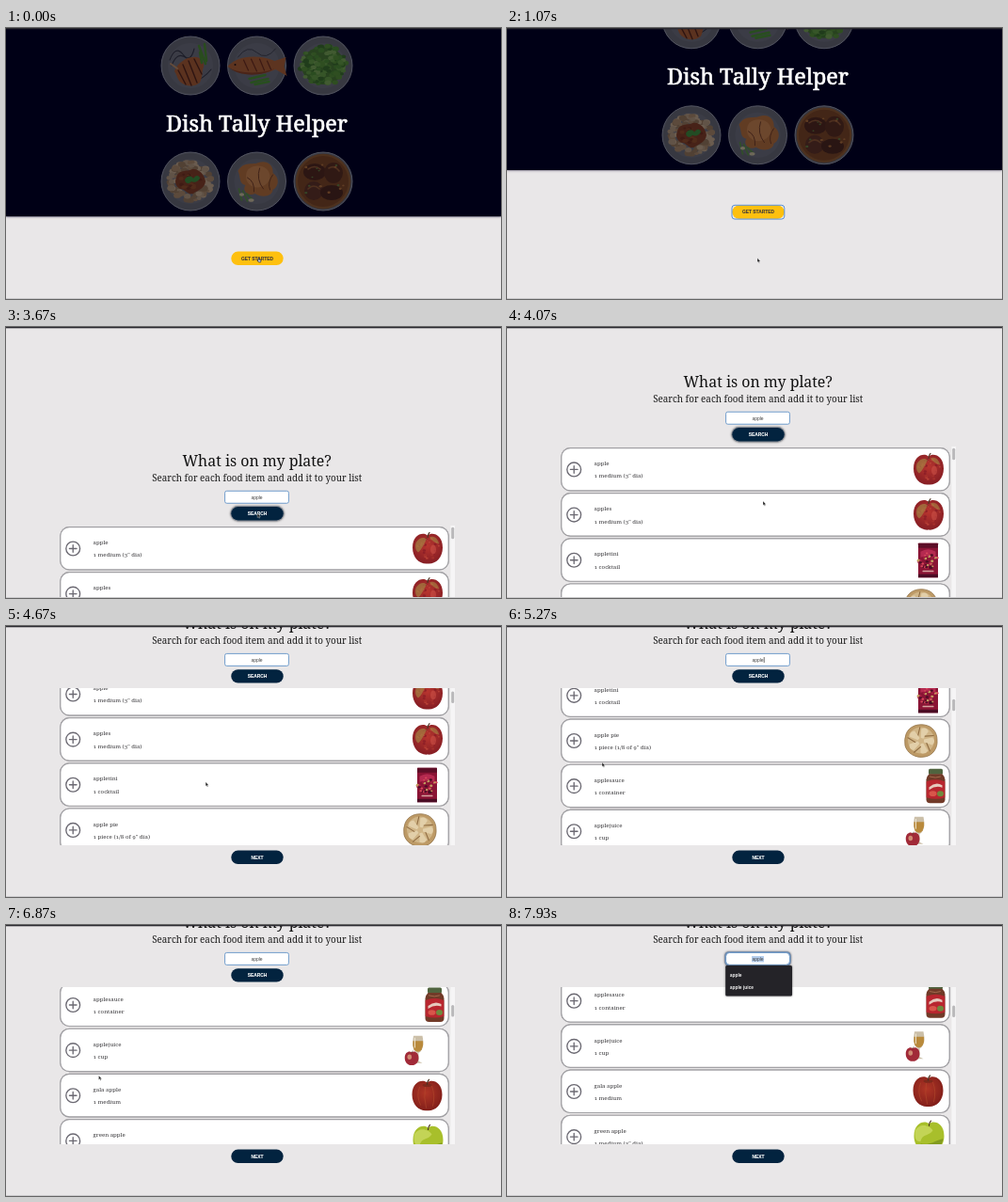
An HTML page that plays this animation: 526 px wide and 288 px high, repeating every 8000 ms.

```html
<!DOCTYPE html>
<html lang="en">
<head>
<meta charset="utf-8">
<title>Meal list demo</title>
<style>
html, body { margin: 0; width: 100%; height: 100%; overflow: hidden; background: #e9e7e8; }
svg { display: block; width: 100vw; height: 100vh; }
text { white-space: pre; }
.serif { font-family: "Noto Serif", serif; font-variant-numeric: oldstyle-nums; }
.sans { font-family: "Liberation Sans", Arial, sans-serif; }
.mid { text-anchor: middle; }
.bold { font-weight: 700; }
.card { fill: #fff; stroke: #a2a1a5; stroke-width: 1.2; filter: drop-shadow(0 .5px .7px rgba(0,0,0,.35)); }
</style>
</head>
<body>
<svg id="stage" viewBox="0 0 526 288" preserveAspectRatio="none"></svg>
<script>
const LOOP = 8000, FPS = 15, PITCH = 48.15;
const LIST_TOP = 463, LIST_H = 167;

let seed = 11;
const rnd = () => (seed = (seed * 16807) % 2147483647) / 2147483647;

const path = (d, fill, extra = '') => `<path d="${d}" fill="${fill}" ${extra}/>`;
const line = (d, color, w = 1) => path(d, 'none', `stroke="${color}" stroke-width="${w}" stroke-linecap="round"`);
const oval = (x, y, rx, ry, fill, extra = '') =>
  `<ellipse cx="${x}" cy="${y}" rx="${rx}" ry="${ry}" fill="${fill}" ${extra}/>`;
const rect = (x, y, w, h, r, fill, extra = '') =>
  `<rect x="${x}" y="${y}" width="${w}" height="${h}" rx="${r}" fill="${fill}" ${extra}/>`;
const text = (x, y, size, fill, cls, str, extra = '') =>
  `<text x="${x}" y="${y}" font-size="${size}" fill="${fill}" class="${cls}" ${extra}>${str}</text>`;
const at = (x, y, body, extra = '') => `<g transform="translate(${x} ${y})" ${extra}>${body}</g>`;

// Scatter small blobs inside a ring
function scatter(n, inner, outer, size, colors) {
  let out = '';
  for (let i = 0; i < n; i++) {
    const a = rnd() * Math.PI * 2, r = inner + (outer - inner) * Math.sqrt(rnd());
    const s = size * (0.6 + rnd() * 0.6);
    out += oval((Math.cos(a) * r).toFixed(1), (Math.sin(a) * r * 0.9).toFixed(1),
      s.toFixed(1), (s * 0.75).toFixed(1), colors[i % colors.length]);
  }
  return out;
}

function plate(x, y, food) {
  return at(x, y, oval(0, 0, 31, 31, '#666867', 'stroke="#a4a8aa" stroke-width=".9"') +
    oval(0, 0, 24, 24, '#6e706f') + food, 'opacity=".54"');
}

const steak =
  line('M-22-6Q-16-22-8-12T4-18M-20 0Q-14-16-4-8M2 18Q14 14 22 4', '#363739', 1.1) +
  path('M-17 6C-14-3-4-9 3-9C9-10 15-5 14 1C12 6 13 12 10 18C3 24-6 21-10 18C-14 15-14 10-17 6Z', '#a85d27') +
  line('M-13 5L-5 20M-8-1L1 21M-2-5L7 18M4-7L12 9', '#55260f', 1.4) +
  line('M-21-2L-14 3', '#b98d5b', 2) +
  line('M9-21L16-2M15-23L17-5M10-14L12-3', '#4c8c26', 2.5);
const fish =
  line('M-20-9Q-10-23 0-14T20-18', '#404143', 1) +
  path('M-31 1C-22-10 0-13 19-5L31-9L29 1L32 11L20 4C6 11-18 11-31 1Z', '#ad6129') +
  path('M-30 2C-18 9 6 9 19 3C6 12-18 12-30 2Z', '#8a431a') +
  line('M-14-6L-9 5M-6-7L0 6M3-7L8 5M11-5L15 4', '#6d2f12', 1.2) +
  oval(-23, -1, 1, 1, '#22130c') +
  line('M-8 14L9 10M-6 18L12 14M-2 20L13 17', '#4b9027', 2.4);
const salad = oval(0, 0, 23, 20, '#4a7a28') +
  scatter(120, 0, 24, 3.2, ['#4f8c29', '#649d38', '#3c7020', '#78a648', '#57902c']);
const pasta = scatter(90, 12, 23, 3.6, ['#b39a72', '#c4aa80', '#96784e', '#aa8a5c']) +
  path('M-15-4C-13-13-4-10 2-13C9-14 15-7 16 0C15 8 8 9 3 13C-3 15-5 8-11 8C-16 5-17 1-15-4Z', '#84401a') +
  scatter(16, 1, 11, 2.4, ['#94501f', '#733213']) +
  path('M-6-2C-3-7 2-6 3-3C6-8 10-6 10-3C7 2 2 1 1 0C-2 4-6 2-6-2Z', '#3f8c30');
const chicken =
  path('M-20-11C-14-22-4-17 2-20C11-23 18-17 17-9C25-4 23 6 17 9C16 17 4 17-2 13C-10 17-16 9-12 4C-19 3-17-5-20-11Z', '#b4702f') +
  path('M-9-13C0-20 13-16 14-6C14 6-2 10-8 3C-13-2-12-9-9-13Z', '#c88342') +
  line('M-10-4Q-2 0-3 11M3-14Q-1-2 7 8M17-7Q11 1 14 9', '#75401a', 1) +
  line('M-19 8L-16 20M-15 10L-10 21M-11 13L-5 19', '#5b8f3c', 1.8) + oval(-16, 14, 2.6, 1.8, '#cbc193') + oval(-6, 20, 3, 1.8, '#cbc193');
const stew = oval(0, 0, 29.3, 29.3, '#8f5b25') + oval(0, 0, 27, 27, '#7c4719') +
  oval(-9, -10, 12, 9, '#522a12') + oval(11, -9, 10, 11, '#5a2f14') + oval(-10, 10, 10, 10, '#60341a') +
  oval(9, 12, 12, 8, '#4c2711') + line('M-16-13Q-9-18-3-13M6-14Q12-18 17-11M-16 8Q-10 2-4 8', '#915928', 1.6) +
  scatter(14, 5, 25, 1.5, ['#657d35', '#b0702f']);

const appleShape = 'M0-14C5-18 16-15 16-1C16 10 8 17 0 16C-8 17-16 10-16-1C-16-15-5-18 0-14Z';
const stem = line('M0-12Q0-15 2-17', '#4b3423', 1.2);
const apple = path(appleShape, 'url(#red)') +
  scatter(34, 2, 13, 1.5, ['#b84036', '#8f2027', '#a6302c']) +
  path('M-12-7C-8-13-3-12-1-10C-4-5-6 1-10 4C-13 2-14-3-12-7Z', '#a39046', 'opacity=".6"') +
  path('M2-12C7-15 12-9 12-5C8-6 5-8 2-12Z', '#a89c4a', 'opacity=".5"') +
  oval(6, 1, 3, 5, '#d4584c', 'opacity=".5"') + stem;
const gala = path(appleShape, 'url(#gala)') +
  line('M-8-9Q-12 0-7 10M-2-9Q-4 2-1 13M5-10Q9 0 6 11', '#b24a2c', .6) + oval(0, -11, 5, 1.8, '#7d291c') + stem;
const green = path(appleShape, '#a8bf2b') +
  path('M-15-6C-10-16 1-12 4-7C-1 0-7-4-9 5C-15 5-15 0-15-6Z', '#c3d456') +
  path('M-9 7C0 10 10 2 15 2C11 20-3 19-9 7Z', '#839b20') + stem;
const packet = rect(-10.5, -18, 21, 36.5, .5, '#8a1435') + rect(-10.5, -18, 21, 5, .5, '#5d0e27') +
  path('M-8-9Q0-14 8-9V-3Q0-6-8-3Z', '#b52a50') + scatter(36, 1, 10, 1.5, ['#d9485c', '#c0a060', '#4a0d24', '#ad2146']) +
  rect(-6, 11, 12, 1.5, .5, '#d6a3a0') + rect(-10.5, 15, 21, 3.5, 0, '#4b0c24');
const slits = [0, 72, 144, 216, 288].map(a => `<g transform="rotate(${a + 20})">` +
  path('M-1.5-3L-4-12Q0-16 4-12L1.5-3Z', '#e2cfa9') + line('M-5-4L-6-13', '#8f6c42', 1.1) + '</g>').join('');
const pie = path('M-16-7C-13-15-5-18 3-17C12-16 17-9 17-1C18 8 12 16 4 17C-6 19-15 13-17 5Q-18-2-16-7Z', '#bd9a66', 'stroke="#94744a" stroke-width=".8"') +
  oval(0, -.5, 14, 14, '#d0b587') + slits;
const jar = rect(-7.5, -18.5, 15, 6, 1.5, '#50643f') +
  path('M-7-13H7Q10-10 10-7V14Q10 18 6 18H-6Q-10 18-10 14V-7Q-10-10-7-13Z', '#713a28') +
  path('M-9.8-5Q0-9 9.8-5V12Q0 15-9.8 12Z', '#b8262f') + path('M-7 1Q0-5 7-1V1.5Q0-1-7 4Z', '#e6c9bd') +
  oval(5, 8, 3.5, 3, '#6f8a3e') + oval(-3, 8, 4, 2.8, '#d8564a') + line('M-6-10Q0-8 5-10', '#a36a4d', 1);
const juice = path('M-1.5-15.5H8Q10-6 7.5-1Q6 2 4 2.5V11.5L8 13.5H-1L2.7 11.5V2.5Q0 2-1.5-2Q-3-7-1.5-15.5Z', '#cbbfa8') +
  path('M-2-10H8.6Q9.4-5 7.2-1Q3.5 4-1-1Q-2.6-5-2-10Z', '#b98a3c') + line('M0-13L0-3', '#f3ead6', .9) +
  at(-3.4, 8.5, `<g transform="scale(.46)">${path(appleShape, '#a12a38')}${oval(-5, -3, 5, 6, '#cf8a72')}${stem}</g>`);

const foods = [
  ['apple', '1 medium (3" dia)', 448, apple],
  ['apples', '1 medium (3" dia)', 448, apple],
  ['appletini', '1 cocktail', 447.5, packet],
  ['apple pie', '1 piece (1/8 of 9" dia)', 440, pie],
  ['applesauce', '1 container', 455.5, jar],
  ['applejuice', '1 cup', 434.5, juice],
  ['gala apple', '1 medium', 447.5, gala],
  ['green apple', '1 medium (3" dia)', 448.5, green],
  ['apple', '1 medium', 448, apple]
];

const card = ([name, amount, x, art], i) => at(0, LIST_TOP + i * PITCH,
  rect(57.8, 1.7, 412.4, 45.4, 9.5, '#fff', 'class="card"') +
  `<circle cx="71.2" cy="24.6" r="7.4" fill="none" stroke="#6b6972" stroke-width="1.35"/>` +
  line('M67.4 24.6H75M71.2 20.8V28.4', '#6b6972', 1.35) +
  text(92.5, 20.3, 6.1, '#3a393c', 'serif', name) +
  text(92.5, 33.6, 6.1, '#3a393c', 'serif', amount) + at(x, 24.6, art));

const button = (y, fill, color, label) => rect(239.3, y, 55.4, 14.4, 7.2, fill) +
  text(267, y + 9, 4.9, color, 'sans bold mid', label, `stroke="${color}" stroke-width=".12"`);

const hero = rect(0, -10, 526, 210.3, 0, '#000016', 'style="filter:drop-shadow(0 .8px 1.5px rgba(20,10,50,.65))"') +
  plate(196, 40, steak) + plate(266.5, 40, fish) + plate(337, 40, salad) +
  plate(196, 163, pasta) + plate(266.5, 163, chicken) + plate(337, 163, stew) +
  text(266.5, 109.5, 23.4, '#fff', 'serif mid', 'Dish Tally Helper', 'stroke="#fff" stroke-width=".65"');

document.getElementById('stage').innerHTML = `
<defs>
  <radialGradient id="red" cx=".5" cy=".4" r=".65"><stop offset="0" stop-color="#b8352f"/><stop offset="1" stop-color="#821c23"/></radialGradient>
  <radialGradient id="gala" cx=".45" cy=".4" r=".65"><stop offset="0" stop-color="#b03626"/><stop offset="1" stop-color="#7e1d19"/></radialGradient>
  <clipPath id="window">${rect(56, LIST_TOP, 422, LIST_H, 0, '#000')}</clipPath>
</defs>
${rect(0, 0, 526, 288, 0, '#e9e7e8')}
<g id="page">
  ${hero}
  ${button(237.6, '#fec00f', '#403c38', 'GET STARTED')}
  ${rect(239, 237.5, 55.8, 14.8, 3, 'none', 'id="ring" stroke="#4a86cf" stroke-width=".9"')}
  ${text(266.7, 400, 15.9, '#111', 'serif mid', 'What is on my plate?')}
  ${text(266.7, 416, 9.85, '#1a1a1a', 'serif mid', 'Search for each food item and add it to your list')}
  ${rect(238.4, 442.2, 57.2, 16.4, 8.2, '#8b8f98', 'id="halo" style="filter:drop-shadow(0 0 1px #777)"')}
  ${button(443.2, '#02233f', '#fff', 'SEARCH')}
  ${rect(231.2, 425.2, 70.6, 15.4, 4.5, '#6d89ad', 'id="glow" style="filter:drop-shadow(0 0 1.2px #6f6c70)"')}
  ${rect(232.6, 426.4, 67.8, 13, 2.5, '#fff', 'id="box" stroke-width=".9"')}
  ${rect(260, 430, 13, 6.4, 0, '#b4cdec', 'id="pick"')}
  <text id="entry" x="266.5" y="434.7" font-size="5" class="sans mid"></text>
  ${rect(0, 430, .7, 6, 0, '#333', 'id="caret"')}
  <g id="results">
    <g clip-path="url(#window)">
      <g id="list">${foods.map(card).join('')}</g>
      ${rect(472.4, LIST_TOP, 4.6, LIST_H, 0, '#f6f5f6')}
      ${rect(473.2, 0, 3, 12.5, 1.5, '#b9b8ba', 'id="thumb"')}
    </g>
    ${button(635.6, '#02233f', '#fff', 'NEXT')}
  </g>
  <g id="menu">
    ${rect(232.2, 440, 70.8, 86, 1.5, '#242328', 'id="menuBox" style="filter:drop-shadow(0 .5px 1px rgba(0,0,0,.5))"')}
    ${[0, 1, 2, 3, 4, 5].map(i => text(236.8, 451.8 + i * 13.25, 4.9, '#f2f2f2', 'sans bold', '', `id="item${i}"`)).join('')}
  </g>
</g>
${rect(0, 0, 526, 1.3, 0, '#2b2a31')}
${rect(0, 287, 526, 1, 0, '#cbcacc')}
<g id="cursor">
  <g id="arrow">${path('M0 0V4.6L1.1 3.6L1.8 5.3L2.6 5L1.9 3.4H3.3Z', '#222', 'stroke="#fff" stroke-width=".3"')}</g>
  <g id="beam">${line('M-1-1Q0-1 0 0V4Q0 5-1 5M1-1Q0-1 0 0M0 4Q0 5 1 5', '#333', .7)}</g>
  <g id="hand">${path('M0 0Q.5-.5 .9 0V1.6L2.6 2Q3.2 2.5 2.6 4.4H.5L-1 2.5L0 2.7Z', '#cfd3dc', 'stroke="#1b2238" stroke-width=".7"')}</g>
</g>`;

const el = {};
document.querySelectorAll('[id]').forEach(n => el[n.id] = n);
const show = (n, on) => n.setAttribute('visibility', on ? 'inherit' : 'hidden');
const move = (n, x, y) => n.setAttribute('transform', `translate(${x.toFixed(2)} ${y.toFixed(2)})`);
const between = (t, a, b) => t >= a && t < b;

// Smooth curve through [time, value] keys without overshoot
function track(keys) {
  const n = keys.length;
  const slope = i => (keys[i + 1][1] - keys[i][1]) / (keys[i + 1][0] - keys[i][0]);
  const tan = keys.map((_, i) => {
    if (!i || i === n - 1) return 0;
    const a = slope(i - 1), b = slope(i);
    return a * b > 0 ? 2 * a * b / (a + b) : 0;
  });
  return t => {
    if (t <= keys[0][0]) return keys[0][1];
    if (t >= keys[n - 1][0]) return keys[n - 1][1];
    const i = keys.findIndex(k => k[0] > t) - 1;
    const [t0, a] = keys[i], [t1, b] = keys[i + 1];
    const d = t1 - t0, u = (t - t0) / d, v = 1 - u;
    return v * v * (1 + 2 * u) * a + u * u * (3 - 2 * u) * b + d * u * v * (v * tan[i] - u * tan[i + 1]);
  };
}

const pageY = track([[600, 0], [870, 6], [1070, 49], [1230, 150], [1350, 225], [1460, 249],
  [3610, 249], [3870, 286], [4070, 336], [4270, 381], [4460, 397]]);
const listY = track([[4470, 0], [4870, 50], [5270, 113], [5670, 138], [6070, 151.5], [6600, 185], [7060, 202.5]]);
const mouseX = track([[0, 268], [1070, 266], [1480, 266], [1870, 260], [2730, 260], [3660, 267], [4070, 272],
  [4470, 262], [4930, 130], [5270, 101], [6070, 98.5], [7070, 98.5], [7530, 260]]);
const mouseY = track([[0, 244.5], [1480, 244.5], [1870, 185], [2730, 185], [3660, 198], [4070, 185],
  [4470, 176], [4930, 152], [5270, 145], [6070, 160], [7070, 160], [7530, 34]]);

const keyTimes = [2730, 2870, 2930, 3000, 3130];
const history = ['chedder cheese', 'apple', 'cheese', 'milk', 'bread', 'hello'];

function suggestions(t) {
  if (between(t, 1930, 2730)) return history;
  if (between(t, 2730, 3200)) return ['apple'];
  return t >= 7730 ? ['apple', 'apple juice'] : [];
}

function render(ms) {
  const t = Math.floor((ms + 4) * FPS / 1000) * 1000 / FPS + 4;
  const scroll = listY(t), typed = keyTimes.filter(k => t >= k).length;

  move(el.page, 0, -pageY(t));
  move(el.list, 0, -scroll);
  el.thumb.setAttribute('y', LIST_TOP + 2 + scroll * 0.086);
  show(el.results, t >= 3670);
  show(el.ring, between(t, 130, 1870));
  show(el.halo, between(t, 3670, 4400));

  const open = between(t, 1870, 3200) || t >= 7670;
  show(el.glow, open);
  el.box.setAttribute('stroke', t < 1870 ? '#aaa9ad' : '#6293c8');
  el.box.setAttribute('rx', open ? 4 : 2);
  show(el.pick, t >= 7670);
  el.entry.textContent = typed ? 'apple'.slice(0, typed) : 'Search For Foods';
  el.entry.setAttribute('fill', typed ? '#444' : '#77767a');

  const blink = between(t, 4470, 7100) && between(t % 1000, 130, 630);
  show(el.caret, between(t, 1930, 2530) || blink);
  el.caret.setAttribute('x', typed ? 272.8 : 266.6);

  const items = suggestions(t);
  show(el.menu, items.length > 0);
  el.menuBox.setAttribute('height', items.length * 13.3 + 6);
  for (let i = 0; i < 6; i++) el['item' + i].textContent = items[i] || '';

  move(el.cursor, mouseX(t), mouseY(t));
  show(el.cursor, !between(t, 2730, 3670) && t < 7700);
  const beam = between(t, 1800, 2730) || t >= 7450, hand = t < 130;
  show(el.beam, beam);
  show(el.hand, hand);
  show(el.arrow, !beam && !hand);
}

const start = performance.now();
function tick() {
  render((performance.now() - start) % LOOP);
  requestAnimationFrame(tick);
}
tick();
</script>
</body>
</html>
```
